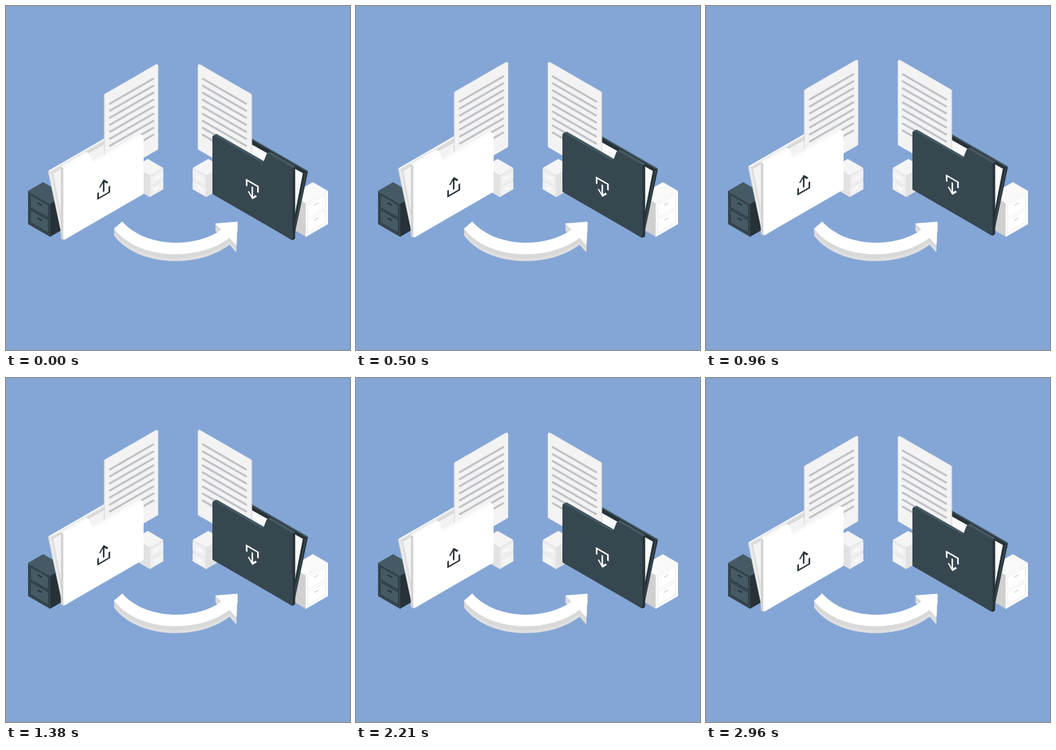
Recreate the animation shown at these times as an HTML page with a canvas. Size 500 by 500 pixels, loop 3 s.

```html
<!DOCTYPE html>
<html lang="en">
<head>
<meta charset="utf-8">
<title>File transfer</title>
<style>
html, body { margin: 0; width: 100%; height: 100%; overflow: hidden; background: #84a6d6; }
canvas { display: block; width: 500px; height: 500px; }
</style>
</head>
<body>
<canvas id="stage"></canvas>
<script>
const canvas = document.getElementById('stage');
const ctx = canvas.getContext('2d');
const ratio = window.devicePixelRatio || 1;
canvas.width = canvas.height = 500 * ratio;

const LOOP = 3000, LIFT = 10;
const K = Math.tan(Math.PI / 6); // isometric slope

const LIGHT = { face: '#ffffff', edge: '#d2d2d2', rim: '#fafafa', board: '#e0e0e0', inside: '#d8d8d8', sheet: '#f3f3f3', icon: '#263238' };
const DARK = { face: '#37474f', edge: '#263238', rim: '#455a64', board: '#263238', inside: '#263238', sheet: '#fafafa', icon: '#ffffff' };
const DARK_CABINET = { top: '#455a64', front: '#37474f', side: '#263238', drawer: '#455a64', line: '#2b3a42', handle: '#263238' };
const LIGHT_CABINET = { top: '#fafafa', front: '#ffffff', side: '#d0d0d0', drawer: '#ffffff', line: '#ebebeb', handle: '#e0e0e0' };

// Filled polygon of [x, y] points with optional rounded corners
function poly(color, pts, r = 0) {
  const at = i => pts[i % pts.length];
  const [a, b] = pts;
  ctx.beginPath();
  ctx.moveTo((a[0] + b[0]) / 2, (a[1] + b[1]) / 2);
  pts.forEach((_, i) => ctx.arcTo(...at(i + 1), ...at(i + 2), r));
  ctx.closePath();
  ctx.fillStyle = color;
  ctx.fill();
}

function line(color, width, pts, cap = 'butt') {
  ctx.beginPath();
  pts.forEach(p => ctx.lineTo(...p));
  ctx.strokeStyle = color;
  ctx.lineWidth = width;
  ctx.lineCap = cap;
  ctx.stroke();
}

// Upright isometric panel from its top left corner
function panel(color, x, y, w, h, slope, r) {
  const dy = w * slope;
  poly(color, [[x, y], [x + w, y + dy], [x + w, y + dy + h], [x, y + h]], r);
}

// Line running along an isometric axis
function isoLine(color, width, x, y, w, slope, cap) {
  line(color, width, [[x, y], [x + w, y + w * slope]], cap);
}

// Box from its near top corner: a to the left, b to the right
function box(x, y, a, b, h, left, right, top) {
  panel(right, x, y, b, h, -K);
  panel(left, x - a, y - a * K, a + 0.4, h, K);
  poly(top, [[x, y], [x - a, y - a * K], [x - a + b, y - (a + b) * K], [x + b, y - b * K]]);
}

function transformed(matrix, draw) {
  ctx.save();
  ctx.transform(...matrix);
  draw();
  ctx.restore();
}
const shifted = (dx, dy, draw) => transformed([1, 0, 0, 1, dx, dy], draw);
const mirrored = draw => transformed([-1, 0, 0, 1, 500, 0], draw);

function cabinet(c) {
  box(64, 287.2, 32, 22, 48.3, c.front, c.side, c.top);
  for (const y of [273.5, 295.5]) {
    panel(c.line, 35, y, 27, 19.5, K);
    panel(c.drawer, 36, y + 1.5, 25, 17.5, K);
    isoLine(c.handle, 2, 46, y + 12.6, 6, K);
  }
}

function smallCabinet() {
  box(209, 246.5, 22.5, 19.5, 31.3, '#e2e2e2', '#ebebeb', '#f5f5f5');
  for (const y of [249, 264.5]) {
    panel('#f2f2f2', 211, y, 17.5, 11.5, -K);
    isoLine('#ffffff', 2, 216, y + 2.3, 6, -K);
  }
}

function arrowShape(color) {
  ctx.beginPath();
  ctx.moveTo(157, 323.5);
  ctx.bezierCurveTo(190, 368, 278, 373, 325, 337);
  ctx.lineTo(334.5, 348);
  ctx.lineTo(336.5, 313.5);
  ctx.lineTo(304, 316);
  ctx.lineTo(313, 325);
  ctx.bezierCurveTo(275, 353, 202, 351, 169, 313.3);
  ctx.fillStyle = color;
  ctx.fill();
}

function arrow() {
  for (let d = 10; d > 0; d--) {
    shifted(0, d, () => arrowShape(d > 6 ? '#e0e0e0' : '#d9d9d9'));
  }
  arrowShape('#ffffff');
}

function page() {
  panel('#d6d6d8', 142.3, 128.4, 78, 125, -K, 2);
  panel('#f3f3f4', 143.5, 128.2, 77.7, 125, -K, 2);
  for (let i = 0; i < 9; i++) {
    isoLine('#bec1c5', 2.9, 151, 142.1 + i * 10.2, 63, -K, 'round');
  }
}

// Tray with an arrow, lying on the cover
function icon(color, x, y, flip) {
  transformed([1, -K, 0, flip, x, y], () => {
    line(color, 2.3, [[-8.2, -1], [-8.2, 7.8], [8.2, 7.8], [8.2, -1]]);
    line(color, 2.3, [[0, 2.5], [0, -13.5]]);
    line(color, 2.3, [[-5.8, -7.2], [0, -13.8], [5.8, -7.2]]);
  });
}

function cover(c) {
  const left = 83.3, right = 200, tall = 87, tab = 19;
  const top = x => 186.3 + (right - x) * K;
  const shape = [
    [left, top(left) - tab], [120.5, top(120.5) - tab], [126.5, top(126.5)],
    [right, top(right)], [right, top(right) + tall], [left, top(left) + tall]
  ];
  for (let d = 3.5; d > 0; d -= 0.5) shifted(-d, -d * K, () => poly(c.rim, shape, 2.5));
  panel(c.edge, left - 3.5, top(left) - tab - 1.5, 4.5, tall + tab - 1, K, 1);
  poly(c.face, shape, 2.5);
}

function folder(c, iconY, flip) {
  poly(c.board, [[61, 240], [146, 191], [198, 182], [198, 270], [85, 340], [82, 339]], 2);
  isoLine(c.rim, 2, 62.5, 240, 84, -K);
  line(c.rim, 1, [[64.5, 242.5], [82.5, 335]]);
  poly(c.inside, [[67, 241.5], [146, 196], [146, 235], [84, 320]]);
  poly(c.sheet, [[68.5, 243], [146, 199.5], [146, 240], [81, 307]]);
  page();
  cover(c);
  icon(c.icon, 142, iconY, flip);
}

function render(now) {
  const t = (now % LOOP) / LOOP;
  const rise = -LIFT * (1 - Math.abs(1 - 2 * t));
  ctx.setTransform(ratio, 0, 0, ratio, 0, 0);
  ctx.fillStyle = '#84a6d6';
  ctx.fillRect(0, 0, 500, 500);

  cabinet(DARK_CABINET);
  smallCabinet();
  mirrored(() => {
    cabinet(LIGHT_CABINET);
    smallCabinet();
  });
  arrow();

  shifted(0, rise, () => {
    folder(LIGHT, 267.5, 1);
    mirrored(() => folder(DARK, 265.4, -1));
  });
}

const start = performance.now();
function tick() {
  render(performance.now() - start);
  requestAnimationFrame(tick);
}
tick();
</script>
</body>
</html>
```
